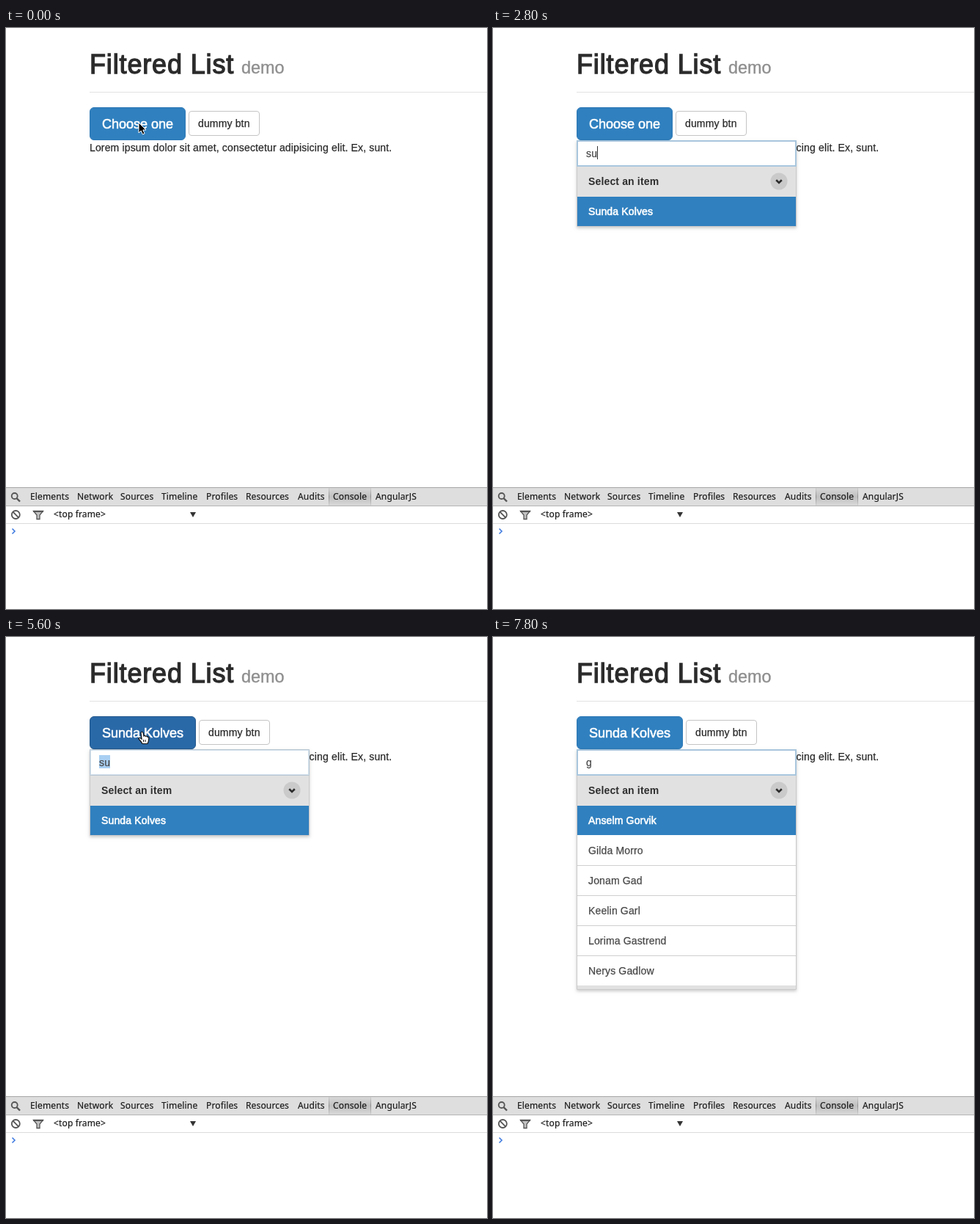
Recreate the animation shown at these times as an HTML page with a canvas. Size 656 by 792 pixels, loop 8 s.

```html
<!DOCTYPE html>
<html lang="en">
<head>
<meta charset="utf-8">
<title>Filtered List demo</title>
<style>
html, body { margin: 0; width: 100%; height: 100%; overflow: hidden; background: #fff; }
canvas { display: block; }
</style>
</head>
<body>
<canvas id="stage" width="656" height="792"></canvas>
<script>
const ctx = document.getElementById('stage').getContext('2d');
const LOOP = 8000;
const STEP = 100;
const SANS = '"Liberation Sans", Arial, sans-serif';
const UI = '"Noto Sans", sans-serif';
const BLUE = '#3080bf';
const PICKED = 'Sunda Kolves';

const ALL = ['Adrene Voss', 'Almina Vostersen Lorem ipsum dolor sit|amet', 'Anselm Gorvik',
  'Ardin Velora', 'Averall Dunmore', 'Barlow Prenk', 'Bendra Halmonten', 'Brenna Falcot'];
const WITH_G = ['Anselm Gorvik', 'Gilda Morro', 'Jonam Gad', 'Keelin Garl',
  'Lorima Gastrend', 'Nerys Gadlow'];

const clamp = v => Math.max(0, Math.min(1, v));
const ramp = (t, a, b) => clamp((t - a) / (b - a));
const mix = (a, b, k) => a + (b - a) * k;
const during = (t, a, b) => t >= a && t < b;

function rect(x, y, w, h, color) {
  ctx.fillStyle = color;
  ctx.fillRect(x, y, w, h);
}

// Small text is set slightly loose.
const tracking = size => size < 16 ? 0.15 : 0;

function setFont(size, font = SANS, weight = 400, spacing = tracking(size)) {
  ctx.font = `${weight} ${size}px ${font}`;
  ctx.letterSpacing = spacing + 'px';
}

function text(str, x, y, size, color, { font, weight, bold = 0, spacing } = {}) {
  setFont(size, font, weight, spacing);
  ctx.fillStyle = ctx.strokeStyle = color;
  ctx.fillText(str, x, y);
  if (bold) {
    ctx.lineWidth = bold;
    ctx.strokeText(str, x, y);
  }
}

function widthOf(str, size) {
  setFont(size);
  return Math.round(ctx.measureText(str).width);
}

function box(x, y, w, h, r, fill, border) {
  ctx.beginPath();
  ctx.roundRect(x + 0.5, y + 0.5, w - 1, h - 1, r);
  ctx.fillStyle = fill;
  ctx.fill();
  ctx.strokeStyle = border;
  ctx.lineWidth = 1;
  ctx.stroke();
}

function poly(points, fill, stroke, width = 1) {
  ctx.beginPath();
  points.forEach(([x, y]) => ctx.lineTo(x, y));
  if (fill) {
    ctx.closePath();
    ctx.fillStyle = fill;
    ctx.fill();
  }
  if (stroke) {
    ctx.strokeStyle = stroke;
    ctx.lineWidth = width;
    ctx.stroke();
  }
}

function circle(x, y, r, fill, stroke, width) {
  ctx.beginPath();
  ctx.arc(x, y, r, 0, Math.PI * 2);
  if (fill) { ctx.fillStyle = fill; ctx.fill(); }
  if (stroke) { ctx.strokeStyle = stroke; ctx.lineWidth = width; ctx.stroke(); }
}

function drawPage(label, hover) {
  text('Filtered List', 114, 62, 36, '#2b2b2b', { bold: 1.3, spacing: 0.85 });
  text('demo', 321, 62, 23.4, '#8f8f8f', { bold: 0.4 });
  rect(114, 87, 542, 1, '#e2e2e2');

  const w = widthOf(label, 18) + 34;
  const shade = (a, b) => `rgb(${a.map((v, i) => mix(v, b[i], hover)).join()})`;
  box(114, 108, w, 45, 5.5, shade([48, 128, 191], [42, 105, 168]), shade([46, 121, 182], [36, 88, 140]));
  text(label, 131, 137, 18, '#fff', { bold: 0.6 });
  box(118 + w, 113, 97, 34, 3.5, '#fff', '#c4c4c4');
  text('dummy btn', 131 + w, 135, 14, '#2a2a2a', { bold: 0.25 });
  text('Lorem ipsum dolor sit amet, consectetur adipisicing elit. Ex, sunt.', 114, 168, 14, '#2a2a2a', { bold: 0.25 });
}

function drawList(names, cut) {
  let y = 230;
  names.forEach((name, i) => {
    const lines = name.split('|');
    const h = 21 + 20 * lines.length;
    if (i === 0) rect(115, y, 298, 40, BLUE);
    lines.forEach((line, n) => text(line, 130, y + 25 + 20 * n, 14, i ? '#484848' : '#fff', { bold: i ? 0.25 : 0.6 }));
    y += h;
    if (i && (cut || i < names.length - 1)) rect(115, y - 1, 298, 1, '#cfcfcf');
  });
}

function drawDropdown({ names, bottom, query, selected, caret, glow }) {
  ctx.save();
  ctx.shadowColor = 'rgba(0,0,0,.2)';
  ctx.shadowBlur = 4;
  ctx.shadowOffsetY = 2;
  rect(114, 153, 300, bottom - 153, '#fff');
  ctx.restore();
  box(114, 153, 300, bottom - 153, 0, '#fff', '#c9c9c9');

  rect(115, 188, 298, 42, '#e1e1e1');
  text('Select an item', 130, 214, 14, '#2e2e2e', { weight: 700 });
  circle(390, 209, 11.5, '#cacaca');
  poly([[386.2, 207.3], [390, 211], [393.8, 207.3]], null, '#2c2c2c', 2.6);

  drawList(names, names === ALL);
  if (names === WITH_G) rect(115, 475, 298, 5, '#e1e1e1');

  box(114, 153, 300, 36, 1, '#fff', '#c6c6c6');
  if (glow) {
    ctx.globalAlpha = glow;
    ctx.strokeStyle = '#a9c6dd';
    ctx.lineWidth = 2;
    ctx.strokeRect(115, 154, 298, 34);
    ctx.globalAlpha = 1;
  }
  const w = widthOf(query, 14);
  if (selected) rect(127, 161, w, 18, '#a9cff2');
  text(query, 127, 176, 14, '#4a4a4a', { bold: 0.25 });
  if (caret) rect(127 + w, 161, 1, query ? 18 : 20, '#333');
}

function drawTools() {
  rect(0, 626, 656, 26, '#dedede');
  rect(0, 626, 656, 1, '#a6a6a6');
  const fade = (edge, middle) => {
    const g = ctx.createLinearGradient(0, 627, 0, 651);
    g.addColorStop(0, edge);
    g.addColorStop(0.5, middle);
    g.addColorStop(1, edge);
    return g;
  };
  rect(440, 627, 58, 24, fade('#d8d8d8', '#c0c0c0'));
  const side = fade('#d0d0d0', '#8c8c8c');
  rect(440, 627, 1, 24, side);
  rect(497, 627, 1, 24, side);
  rect(0, 651, 656, 1, '#b4b4b4');

  const tabs = { Elements: 33, Network: 97, Sources: 156, Timeline: 212, Profiles: 273,
    Resources: 327, Audits: 398, Console: 446, AngularJS: 504 };
  for (const tab in tabs) text(tab, tabs[tab], 643, 12, '#1c1c1c', { font: UI, bold: 0.2 });
  circle(11.7, 638, 4, null, '#555', 1.8);
  poly([[14.5, 641], [19, 645.5]], null, '#555', 2.4);

  rect(0, 675, 656, 1, '#dcdcdc');
  circle(13.3, 663.5, 5.5, null, '#555', 1.8);
  poly([[9.5, 659.7], [17.1, 667.3]], null, '#555', 1.8);
  poly([[37.5, 658.5], [50.5, 658.5], [46, 664], [46, 669.5], [42, 669.5], [42, 664]], '#c2c2c2', '#555', 1.3);
  rect(37, 658, 14, 2, '#555');
  text('<top frame>', 65, 667, 12, '#1c1c1c', { font: UI, bold: 0.2 });
  poly([[251, 660], [259, 660], [255, 667]], '#333');
  poly([[8.5, 682.5], [12, 686], [8.5, 689.5]], null, '#3f7be0', 1.6);
}

const cursors = {
  arrow() {
    poly([[0, 0], [0, 14], [3.2, 11], [5.4, 16], [8, 14.9], [5.8, 10], [10, 10]], '#000', '#fff', 1);
  },
  hand() {
    ctx.beginPath();
    ctx.moveTo(0, 1.5);
    ctx.quadraticCurveTo(1.5, -1, 3, 1.5);
    ctx.lineTo(4, 6);
    ctx.quadraticCurveTo(5.5, 4.5, 6.5, 6.5);
    ctx.quadraticCurveTo(8, 5.2, 8.8, 7.2);
    ctx.quadraticCurveTo(10.8, 6.8, 10.8, 9);
    ctx.quadraticCurveTo(10.8, 13, 9, 16.5);
    ctx.lineTo(2, 16.5);
    ctx.quadraticCurveTo(0, 13, -3.3, 9.5);
    ctx.quadraticCurveTo(-2, 7.2, 1, 10);
    ctx.closePath();
    ctx.fillStyle = '#fff';
    ctx.fill();
    ctx.strokeStyle = '#111';
    ctx.lineWidth = 1.2;
    ctx.stroke();
    poly([[3.5, 11], [3.5, 14]], null, '#111');
    poly([[6, 11], [6, 14]], null, '#111');
  },
  beam() {
    poly([[-3, -7], [-1, -7], [0, -6], [0, 7], [-1, 8], [-3, 8]], null, '#222', 1.2);
    poly([[3, -7], [1, -7], [0, -6], [0, 7], [1, 8], [3, 8]], null, '#222', 1.2);
    poly([[-2, 2.5], [2, 2.5]], null, '#222');
  }
};

// Each leg: start, end, from and to positions.
const legs = [
  [0, 300, 181, 129, 181, 129],
  [300, 700, 181, 129, 168, 129],
  [1200, 1500, 168, 129, 180, 86],
  [5000, 5400, 181, 109, 184, 129],
  [6000, 6200, 184, 129, 187, 162]
];

function drawCursor(t) {
  if (during(t, 2600, 5000) || t >= 6900) return;
  const [a, b, x0, y0, x1, y1] = legs.filter(leg => leg[0] <= t).pop();
  const k = ramp(t, a, b);
  const y = mix(y0, y1, k);
  const kind = t < 400 || y < 108 ? 'arrow' : y > 153 ? 'beam' : 'hand';
  ctx.save();
  ctx.translate(mix(x0, x1, k), y);
  cursors[kind]();
  ctx.restore();
}

function dropdownAt(t) {
  if (t < 800 || during(t, 4200, 5500)) return null;
  const blink = start => Math.floor((t - start) / 500) % 2 === 0;
  const full = { names: ALL, bottom: 586 };
  const one = { names: [PICKED], bottom: 271 };
  if (t < 2600) return { ...full, query: '', caret: blink(800), glow: ramp(t, 800, 1000) };
  if (t < 2800) return { ...full, query: 's', caret: true, glow: 1 };
  if (t < 4200) return { ...one, query: 'su', caret: t < 3400 || t >= 3900, glow: 1 };
  if (t < 6900) return { ...one, query: 'su', selected: true, glow: ramp(t, 5500, 5700) };
  if (t < 7300) return { ...full, query: '', caret: true, glow: 1 };
  return { names: WITH_G, bottom: 481, query: 'g', caret: blink(7300), glow: 1 };
}

function draw(t) {
  rect(0, 0, 656, 792, '#fff');
  const hover = ramp(t, 300, 600) - ramp(t, 1200, 1500) + ramp(t, 5000, 5300) - ramp(t, 6000, 6200);
  drawPage(t < 4200 ? 'Choose one' : PICKED, hover);
  const list = dropdownAt(t);
  if (list) drawDropdown(list);
  drawTools();
  drawCursor(t);
}

const began = performance.now();
function tick() {
  const t = (performance.now() - began) % LOOP;
  draw(Math.floor(t / STEP) * STEP);
  requestAnimationFrame(tick);
}
tick();
</script>
</body>
</html>
```
